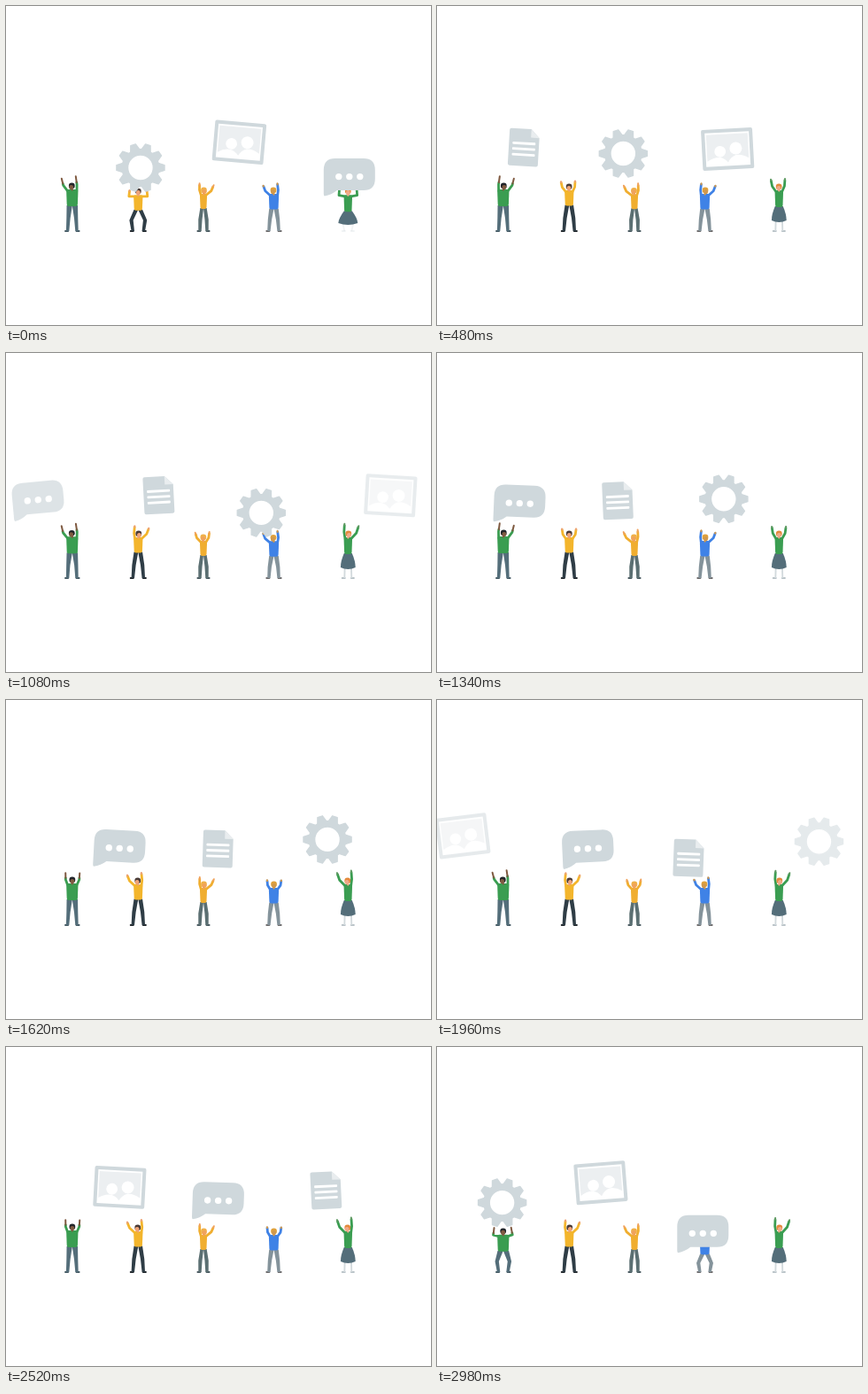
Recreate the animation shown at these times as an HTML page. Size 480 px wide and 360 px high, loop 3000 ms.

```html
<!DOCTYPE html>
<html lang="en">
<head>
<meta charset="utf-8">
<title>Passing things along</title>
<style>
  html, body { margin: 0; width: 100%; height: 100%; overflow: hidden; background: #fff; }
  svg { display: block; width: 100vw; height: 100vh; }
</style>
</head>
<body>
<svg id="stage" viewBox="0 0 480 360"></svg>
<script>
const LOOP = 3000, SLOT = 600, GREY = '#cfd8dc';
const stage = document.getElementById('stage');

function add(parent, tag, attrs) {
  const node = document.createElementNS('http://www.w3.org/2000/svg', tag);
  set(node, attrs);
  parent.appendChild(node);
  return node;
}
function set(node, attrs) {
  for (const key in attrs) node.setAttribute(key, attrs[key]);
}
const mix = (a, b, k) => a + (b - a) * k;
const clamp = v => Math.max(0, Math.min(1, v));
const mod = (a, n) => ((a % n) + n) % n;
const points = list => list.map(p => p.map(v => v.toFixed(2)).join()).join(' ');

// Smooth curve through [x, y] keys
function curve(keys) {
  const slope = i => {
    const a = keys[Math.max(0, i - 1)], b = keys[Math.min(keys.length - 1, i + 1)];
    return (b[1] - a[1]) / (b[0] - a[0]);
  };
  return x => {
    if (x <= keys[0][0]) return keys[0][1];
    const i = keys.findIndex(k => k[0] >= x) - 1;
    if (i < 0) return keys[keys.length - 1][1];
    const [x0, y0] = keys[i], [x1, y1] = keys[i + 1], w = x1 - x0, k = (x - x0) / w;
    return mix(y0, y1, k * k * (3 - 2 * k))
      + w * k * (1 - k) * ((1 - k) * slope(i) - k * slope(i + 1));
  };
}

// Phase n means "in the hands of person n"
const columns = [-132, 75, 150, 223, 302, 386, 541];
const bottomAt = curve([
  [.6, 168], [.78, 178], [.98, 201], [1.05, 203], [1.3, 181], [1.5, 177], [1.7, 182],
  [2, 209.5], [2.28, 183], [2.5, 178], [2.82, 192.5], [3, 210], [3.2, 189.5], [3.5, 178],
  [3.78, 200], [3.97, 226], [4.3, 187], [4.5, 178], [4.72, 183.5], [5, 208], [5.28, 187], [5.5, 178]
]);
const leanAt = curve([[0, 0], [.18, .9], [.35, 1], [.52, .85], [.75, -.1], [.97, -.95], [1.3, -1], [1.5, 0]]);
const crouchAt = curve([[0, 1], [.2, 0], [.3, 0], [1.2, 0], [1.3, .05], [1.47, .93], [1.5, 1]]);

const people = [
  { x: 74.8, top: 207, hip: 226, wide: 6.6, reach: 193.5, shirt: '#3a9d51', legs: '#546e7a', shoes: '#455a64',
    skin: '#7f5a41', hair: '#22252a', stance: 5.2, bare: .25 },
  { x: 149.3, top: 208, hip: 225.5, wide: 5.1, reach: 196.5, shirt: '#f3b52c', legs: '#2f3d46', shoes: '#20262b',
    skin: '#eda277', hair: '#4a3b36', stance: 6, bare: .85 },
  { x: 223, top: 212, hip: 229, wide: 4, reach: 201, shirt: '#f0ae30', legs: '#5b6f72', shoes: '#4a5a60',
    skin: '#f0a25c', hair: '#f0b04a', stance: 4, bare: .7 },
  { x: 302.5, top: 212, hip: 229.5, wide: 5.6, reach: 201.5, shirt: '#3f82e6', legs: '#84939b', shoes: '#6d6a6b',
    skin: '#d0984c', hair: '#dfa13c', stance: 5.6, bare: .85 },
  { x: 386.3, top: 208, hip: 227, wide: 4.7, reach: 194, shirt: '#3a9d51', legs: '#d3dadd', shoes: '#b9c3c8',
    skin: '#5f9a63', hair: '#e48a3c', face: '#f0a98a', stance: 4, bare: .8, skirt: '#546e7a' }
];

function buildPerson(p) {
  const g = add(stage, 'g', { 'stroke-linejoin': 'round', 'stroke-linecap': 'round', fill: 'none' });
  const line = (stroke, width) => add(g, 'polyline', { stroke, 'stroke-width': width });
  const pair = (stroke, width) => [line(stroke, width), line(stroke, width)];
  const face = p.face || p.skin;
  p.shoe = pair(p.shoes, 1.9);
  p.leg = [0, 1].map(() => add(g, 'polygon', { fill: p.legs }));
  if (p.skirt) p.skirtPath = add(g, 'path', { fill: p.skirt });
  p.arm = pair(p.shirt, 2.8);
  p.hand = pair(p.skin, 2);
  p.body = add(g, 'path', { fill: p.shirt });
  p.neck = line(face, 2.2);
  p.hairDot = add(g, 'ellipse', { rx: 3.4, ry: 3.3, fill: p.hair });
  p.faceDot = add(g, 'ellipse', { rx: 2.4, ry: 2.7, fill: face });
}

// Tapered limb around hip, knee and foot
function limb(joints, widths) {
  const edge = side => joints.map(([x, y], i) => [x + side * widths[i] / 2, y]);
  return points([...edge(-1), ...edge(1).reverse()]);
}

function posePerson(p, q) {
  const lean = leanAt(q), crouch = clamp(crouchAt(q));
  const top = p.top + 5.2 * crouch, hip = p.hip + 5.2 * crouch, { x, wide } = p;
  [-1, 1].forEach((side, i) => {
    const shoulder = [x + side * (wide - 1.4), top + 1.8];
    const hand = [x + side * (8 + 1.7 * crouch) + 4 * lean,
      p.reach + 2 - 2 * Math.abs(lean) + side * lean * 1.2 + 9.5 * crouch];
    const elbow = [mix(shoulder[0], hand[0], .6) + side * (.8 + 2.4 * crouch),
      mix(shoulder[1], hand[1], .45) + 3 * crouch];
    const cuff = [mix(elbow[0], hand[0], p.bare), mix(elbow[1], hand[1], p.bare)];
    set(p.arm[i], { points: points([shoulder, elbow, cuff]) });
    set(p.hand[i], { points: points([cuff, hand]) });

    const foot = x + side * p.stance;
    const knee = [x + side * (mix(p.stance, 3, .4) + 3 * crouch), mix(hip, 254, .48)];
    const widths = p.skirt ? [2, 2, 1.8] : [wide - .3, 4.3, 3.4];
    set(p.leg[i], { points: limb([[x + side * (wide / 2 - .2), hip - 1], knee, [foot, 254]], widths) });
    set(p.shoe[i], { points: points([[foot - side * .5, 254], [foot + side * 2.6, 254]]) });
  });
  set(p.body, { d: `M${x - wide + 2} ${top}H${x + wide - 2}Q${x + wide} ${top} ${x + wide} ${top + 3}
    L${x + wide - .5} ${hip - 2}Q${x + wide - .7} ${hip} ${x + wide - 2.5} ${hip}H${x - wide + 2.5}
    Q${x - wide + .7} ${hip} ${x - wide + .5} ${hip - 2}L${x - wide} ${top + 3}Q${x - wide} ${top} ${x - wide + 2} ${top}Z` });
  if (p.skirt) {
    const hem = 244 + 3 * crouch, w = 8.4 + 2.6 * crouch;
    set(p.skirtPath, { d: `M${x - 4.5} ${hip - 1}H${x + 4.5}Q${x + w} ${hip + 8} ${x + w} ${hem - 2}
      Q${x} ${hem + 2} ${x - w} ${hem - 2}Q${x - w} ${hip + 8} ${x - 4.5} ${hip - 1}Z` });
    p.leg.forEach(leg => set(leg, { opacity: 1 - .7 * crouch }));
    p.shoe.forEach(shoe => set(shoe, { opacity: 1 - .8 * crouch }));
  }
  const headX = x + lean * .5, headY = top - 3.2;
  set(p.neck, { points: points([[headX, headY + 2], [x, top + .5]]) });
  set(p.hairDot, { cx: headX, cy: headY - .9 });
  set(p.faceDot, { cx: headX + lean * .6, cy: headY + .8 });
}

function drawGear(g) {
  const teeth = 10, rim = [];
  for (let i = 0; i < teeth; i++) {
    for (const [turn, r] of [[-.4, 20.8], [-.17, 27.2], [.17, 27.2], [.4, 20.8]]) {
      const a = (i + turn) * 2 * Math.PI / teeth;
      rim.push([r * Math.cos(a), r * Math.sin(a)]);
    }
  }
  add(g, 'path', {
    d: `M${points(rim)}Z M14.4 0A14.4 14.4 0 1 0 -14.4 0A14.4 14.4 0 1 0 14.4 0Z`,
    fill: GREY, 'fill-rule': 'evenodd', stroke: GREY, 'stroke-width': 1.4, 'stroke-linejoin': 'round'
  });
}

function drawPicture(g) {
  add(g, 'rect', { x: -29, y: -23, width: 58, height: 46, rx: 2, fill: GREY });
  add(g, 'rect', { x: -25, y: -19, width: 50, height: 38, fill: '#fff' });
  add(g, 'path', {
    d: 'M-23.5 -17H23.5V11Q16 6 9 7Q3 9 0 15Q-4 10 -9 9Q-16 8 -23.5 13Z', fill: '#eceff1'
  });
  add(g, 'circle', { cx: -8.6, cy: 2.4, r: 6.4, fill: '#fff' });
  add(g, 'circle', { cx: 9.2, cy: -.4, r: 7, fill: '#fff' });
}

function drawChat(g) {
  add(g, 'path', {
    d: 'M-16 -18H16Q29 -18 29 -5V5Q29 18 16 18H-14Q-20 23 -28 24.5Q-29 24 -29 22V-5Q-29 -18 -16 -18Z', fill: GREY
  });
  for (const cx of [-12, 0, 12]) add(g, 'circle', { cx, cy: 2.6, r: 3.7, fill: '#fff' });
}

function drawPage(g) {
  add(g, 'path', { d: 'M-15 -21H7.5L17 -11.5V19Q17 21 15 21H-15Q-17 21 -17 19V-19Q-17 -21 -15 -21Z', fill: GREY });
  add(g, 'path', { d: 'M7.5 -21L17 -11.5H7.5Z', fill: '#e9edef' });
  for (const y of [-6, .4, 6.8]) add(g, 'rect', { x: -13, y, width: 26, height: 2.8, rx: .8, fill: '#fff' });
}

const things = [
  { draw: drawGear, start: 2.025, half: 26.5, swing: 0 },
  { draw: drawPicture, start: 3.51, half: 24.5, swing: 1 },
  { draw: drawChat, start: 5.01, half: 18, swing: 1 },
  { draw: drawPage, start: .505, half: 21, swing: 1 }
];

function placeThing(thing, beat) {
  const phase = mod(thing.start + beat, 6), slot = Math.floor(phase), f = phase - slot;
  const x = mix(columns[slot], columns[slot + 1], f);
  const y = bottomAt(phase) - thing.half;
  const swing = thing.swing * (slot === 0 ? -17 : slot % 2 ? 5 : -4.5);
  const angle = swing * Math.sin(Math.PI * f) ** 2;
  const opacity = Math.min(clamp((phase - .68) / .19), clamp((5.45 - phase) / .3));
  set(thing.node, {
    transform: `translate(${x.toFixed(2)} ${y.toFixed(2)}) rotate(${angle.toFixed(2)})`,
    opacity: opacity.toFixed(3)
  });
}

people.forEach(buildPerson);
things.forEach(thing => {
  thing.node = add(stage, 'g', {});
  thing.draw(thing.node);
});

function render(ms) {
  const beat = mod(ms, LOOP) / SLOT;
  people.forEach((p, i) => posePerson(p, mod(beat - .5 - i, 1.5)));
  things.forEach(thing => placeThing(thing, beat));
}

const began = performance.now();
function tick() {
  render(performance.now() - began);
  requestAnimationFrame(tick);
}
tick();
</script>
</body>
</html>
```
